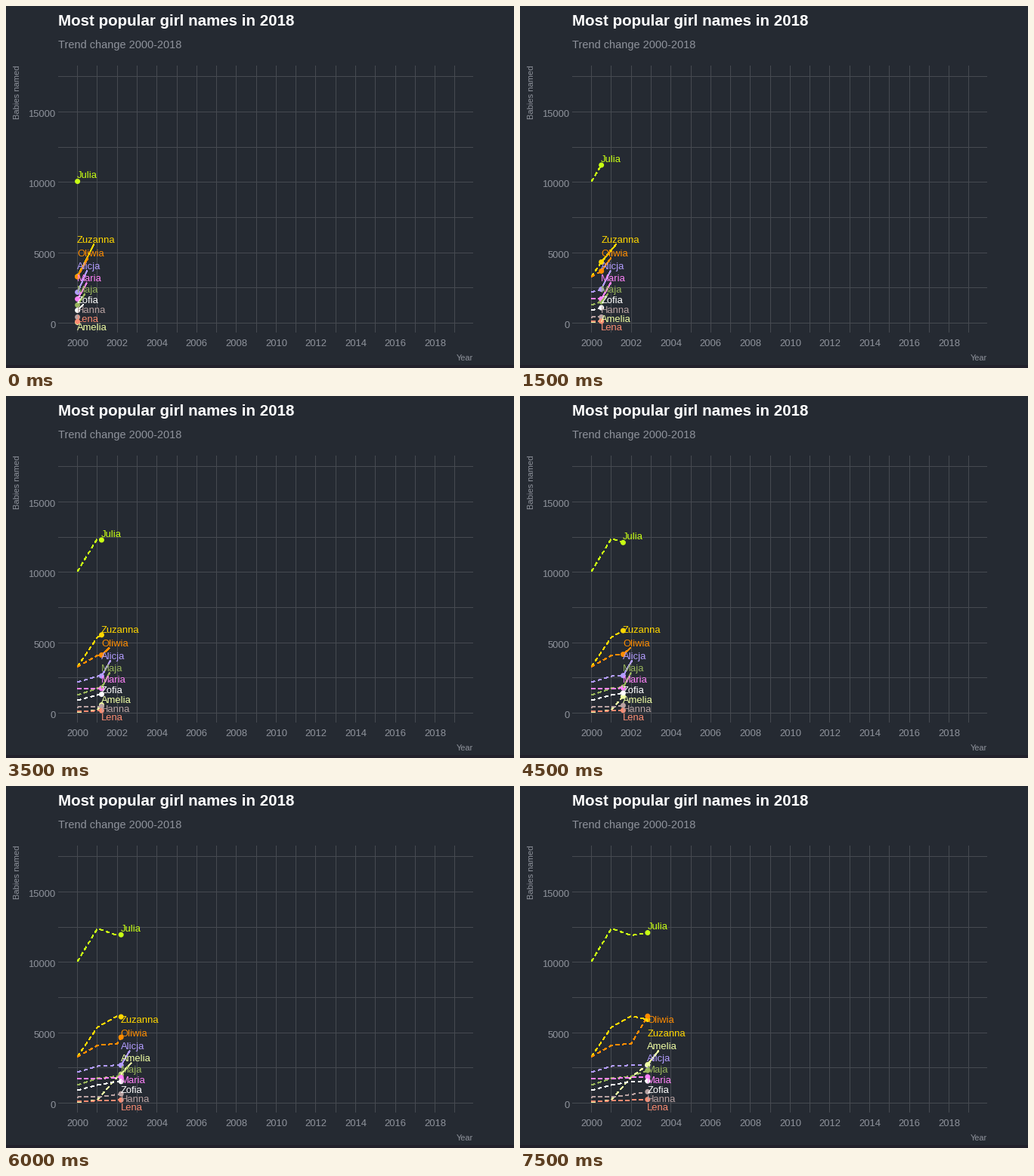
A matplotlib script that plays this animation: 672x480 px, repeating every 8 s.

```python
import numpy as np
import matplotlib.pyplot as plt
from matplotlib.animation import FuncAnimation

W, H, DPI = 672, 480, 96
PT = 72 / DPI                    # points per pixel
FRAMES, INTERVAL = 16, 500
X0, YEAR_W = 94.6, 26.28         # x of 2000, width of one year
Y0, PER_BABY = 420.5, 93.35 / 5000
BG, GRID, MUTED = "#252a32", "#464a51", "#8e929b"
FONT = "Liberation Sans"

# name: (colour, babies named in 2000..2003)
GIRLS = {
    "Alicja": ("#b39dff", [2196, 2624, 2694, 2678]),
    "Amelia": ("#f0ffa5", [54, 241, 1848, 2919]),
    "Hanna": ("#b8a2a2", [428, 439, 616, 846]),
    "Julia": ("#c8ff14", [10069, 12399, 11917, 12142]),
    "Lena": ("#fa8c72", [107, 171, 214, 268]),
    "Maja": ("#98b55c", [1285, 1767, 1901, 2410]),
    "Maria": ("#ff83fa", [1714, 1730, 1821, 1875]),
    "Zuzanna": ("#ffd700", [3310, 5383, 6186, 5892]),
    "Oliwia": ("#ff8c00", [3294, 4097, 4231, 6588]),
    "Zofia": ("#ffffff", [910, 1285, 1526, 1580]),
}
LOWEST = 425                     # middle of the lowest label
HALF_H = 7                       # half height of a label box
MIN_GAP = 13.15                  # shorter leaders are not drawn

fig = plt.figure(figsize=(W / DPI, H / DPI), dpi=DPI, facecolor=BG)
ax = fig.add_axes([0, 0, 1, 1])
ax.set_xlim(0, W)
ax.set_ylim(H, 0)
ax.axis("off")


def px(year):
    return X0 + np.asarray(year) * YEAR_W


def py(babies):
    return Y0 - np.asarray(babies) * PER_BABY


def put(x, mid, s, size, color, **kw):
    """Text whose capitals are centred on mid."""
    return ax.text(x, mid + 0.36 * size, s, fontsize=size * PT, color=color,
                   family=FONT, va="baseline", **kw)


def line(xs, ys, color, **kw):
    return ax.plot(xs, ys, color=color, lw=PT, solid_capstyle="butt",
                   antialiased=False, snap=False, **kw)[0]


def draw_chart():
    ax.add_patch(plt.Rectangle((0, 476), W, 4, color="#22212b", lw=0))
    for k in range(20):
        x = np.floor(px(k)) + 0.5
        line([x, x], [79, 433], GRID, zorder=1)
        if k % 2 == 0:
            put(px(k), 446, str(2000 + k), 13, MUTED, ha="center")
    for babies in range(0, 20000, 2500):
        y = np.floor(py(babies)) + 0.5
        line([69, 618], [y, y], GRID, zorder=1)
        if babies % 5000 == 0:
            put(65.5, y + 1.5, str(babies), 13, MUTED, ha="right")
    put(69, 18.5, "Most popular girl names in 2018", 20.5, "white", weight="bold")
    put(69, 50.5, "Trend change 2000-2018", 14.5, MUTED)
    put(618, 466, "Year", 11, MUTED, ha="right")
    ax.text(18.5, 79, "Babies named", fontsize=11.1 * PT, color=MUTED, family=FONT,
            ha="right", va="baseline", rotation=90, rotation_mode="anchor")


class Girl:
    def __init__(self, name, color, counts):
        self.counts = counts
        self.trail = line([], [], color, linestyle=(0, (4, 4)),
                          dash_capstyle="butt", zorder=3)
        self.dot = ax.add_patch(plt.Circle((0, 0), 3.5, color=color, lw=0, zorder=4))
        self.leader = line([], [], color, zorder=6)
        self.label = put(0, 0, name, 13, color, zorder=8)
        box = self.label.get_window_extent(fig.canvas.get_renderer())
        self.half_w = box.width / 2

    def move(self, year):
        past = np.arange(int(year) + 1)
        years = np.append(past, year)
        self.now = np.interp(year, range(len(self.counts)), self.counts)
        self.x, self.y = px(year), py(self.now)
        self.trail.set_data(px(years), py(np.interp(years, range(4), self.counts)))
        self.dot.set_center((self.x, self.y))

    def place_label(self, mid):
        x, y = self.x, self.y
        if mid - y > 30:         # free of the pile: sit just above the dot
            mid = y - 9
        self.label.set_position((x - 0.5, mid + 4.7))
        gap = y - mid
        if gap > MIN_GAP:
            cut = HALF_H / gap
            self.leader.set_data([x + self.half_w * (1 - cut), x], [mid + HALF_H, y])
        else:
            self.leader.set_data([], [])


draw_chart()
girls = [Girl(name, *spec) for name, spec in GIRLS.items()]


def update(i):
    year = (4.2 * i + 0.05 * i * i) / YEAR_W
    for girl in girls:
        girl.move(year)
    # Labels pile up in rank order, with gaps that grow upwards.
    for k, girl in enumerate(sorted(girls, key=lambda g: g.now)):
        girl.place_label(LOWEST - k * (k + 21) / 2)
    return []


anim = FuncAnimation(fig, update, frames=FRAMES, interval=INTERVAL,
                     repeat=True, repeat_delay=0, init_func=lambda: update(0))
plt.show()
```
